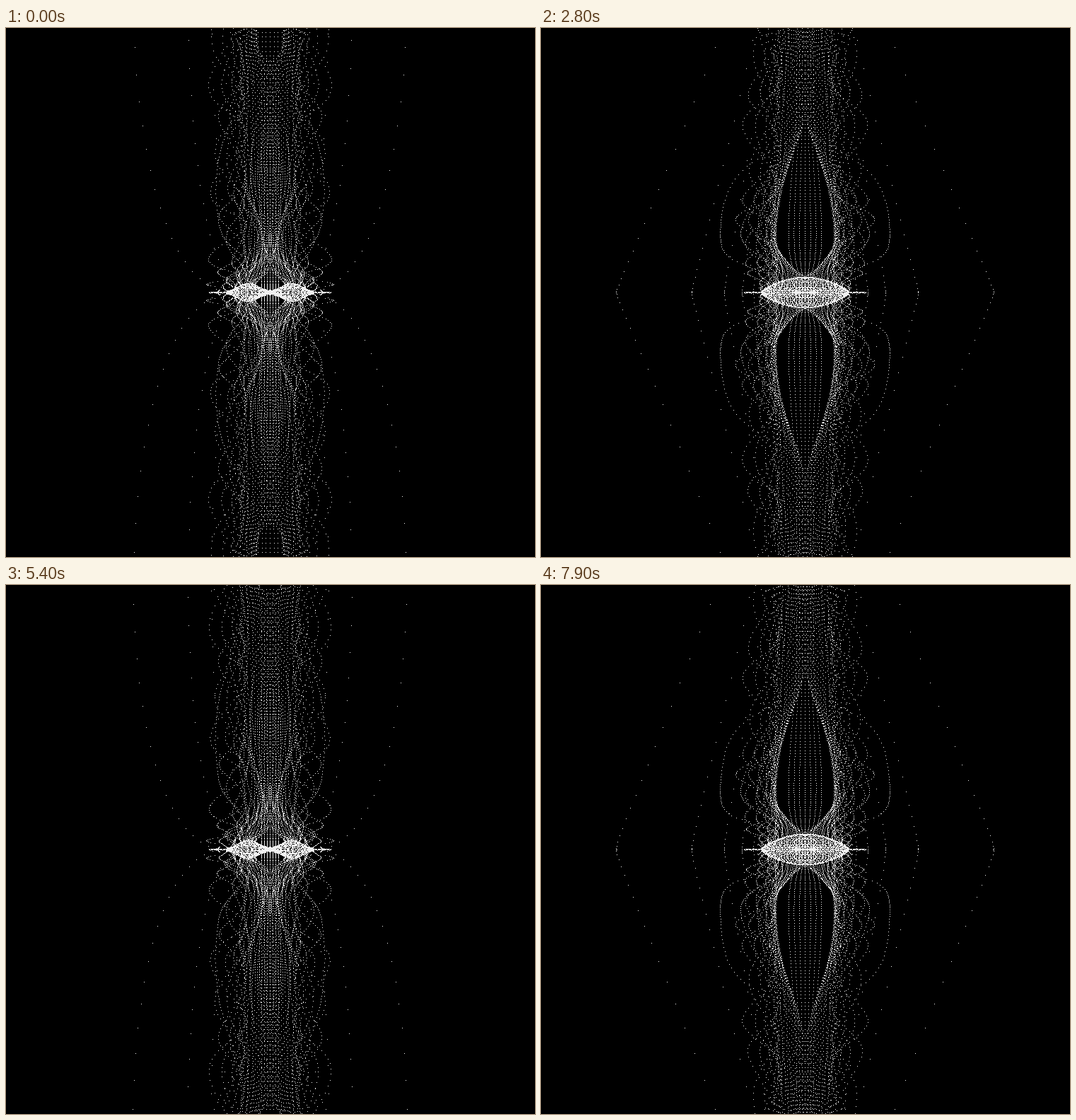
Write an HTML page with a canvas that moves like this. It is 748 px wide and 748 px high and loops after 8000 ms.

```html
<!DOCTYPE html>
<html>
<head>
<meta charset="utf-8">
<style>
html, body { margin: 0; width: 100%; height: 100%; overflow: hidden; background: #000; }
canvas { display: block; }
</style>
</head>
<body>
<canvas id="stage" width="748" height="748"></canvas>
<script>
const ctx = document.getElementById('stage').getContext('2d');
const MID = 374, CX = 373.5, SPREAD = 2.5, DEPTH = 1.2;
const PERIOD = 5, BIRTH = .65, ROWS = 110, COLUMNS = 25;

const mix = (a, b, f) => a + (b - a) * f;
const toRow = dist => Math.sqrt(dist / DEPTH);

function smooth(a, b, v) {
  const f = Math.min(1, Math.max(0, (v - a) / (b - a)));
  return f * f * (3 - 2 * f);
}

// An opening is born near the middle, grows, then drifts outwards.
function pose(t) {
  const age = (t - BIRTH + PERIOD) % PERIOD;
  const calm = smooth(2.3, 3.3, age) * (1 - smooth(4.8, 5, age));
  const lobes = 1 - smooth(.4, 1.2, age) * (1 - smooth(2.4, 3.2, age));
  return {
    t, calm, lobes,
    start: mix(20 + 60 * Math.exp(-age), 80 * age - 26, smooth(2.3, 3.3, age)),
    end: 80 + 81 * age + 200 * smooth(2.3, 3.3, age),
    width: 18 + 24 * Math.max(0, Math.sin(Math.PI * age / 4.4)),
    core: 2 + 32 * lobes,
    reach: 267 - 72 * calm,
    crest: 10 - 10 * Math.cos(2 * Math.PI * (age - 1.9) / PERIOD)
  };
}

function dot(x, y) {
  if (y >= 0 && y < 748) ctx.fillRect(Math.floor(x), Math.floor(y), 1, 1);
}

function pair(x, y) {
  dot(CX + x, y);
  dot(CX - x, y);
}

// half width of an opening between rows a and b
function opening(e, a, b, width, skew) {
  const s = (e - a) / (b - a);
  return s > 0 && s < 1 ? width * Math.sin(Math.PI * s ** skew) : 0;
}

function body(side, p) {
  const a = toRow(p.start), b = toRow(p.end * (side > 0 ? 1.06 : 1)), c = toRow(p.core);
  const skew = mix(.7, .35, p.calm);
  for (let r = 0; r < ROWS; r++) {
    for (let n = 0; n < COLUMNS; n++) {
      const k = n + .6, q = k / COLUMNS;
      const e = 18 * ((r + n * .37 % 1) / ROWS) ** 1.15;
      const gap = Math.max(opening(e, a, b, p.width, skew), opening(e, 1.7, c, 26, .8));
      const edge = Math.min(Math.abs(e - a), Math.abs(e - b), Math.abs(e - c));
      const pull = gap ? gap * gap / (4 * SPREAD) : -60 * (1 - Math.exp(-edge / 2));
      let x = SPREAD * k + 120 * Math.tanh(pull / k / 120);
      // frayed rim, and a waist on every other column while calm
      x *= 1 + .45 * q ** 3 * Math.sin(e * 1.3 - 1.3 * p.t + n * 2.1) * Math.min(1, e / 5);
      if (n % 2) x *= 1 - .62 * p.calm * Math.exp(-(((DEPTH * e * e - 70) / 55) ** 2));
      const w = e + .25 * Math.sin(e * 1.2 + n * .2 - 2.4 * p.t) * Math.min(1, e / 4);
      pair(x, MID + side * DEPTH * w * Math.hypot(w, k * .15));
    }
    // thin threads seen through the openings
    const e = 18 * r / ROWS, gap = opening(e, a, b, p.width, skew);
    const y = MID + side * DEPTH * e * e;
    dot(CX, y);
    for (let j = 1; j < 4; j++) pair(j * (4 + gap * .09), y);
  }
}

function fringe(side, { reach, crest }) {
  for (let e = side > 0 ? .5 : 0; e < 18; e++) {
    for (let n = 0; n < 6; n++) {
      const row = e + n * .23;
      const x = reach * Math.cos(.065 * (row - crest)) * 3 / (3 + 2 * n);
      pair(x, MID + side * DEPTH * row * row);
    }
  }
}

function bow({ lobes }) {
  for (let n = 0; n < 70; n++) {
    const u = n / 50;
    const thick = u < 1
      ? 2 + lobes * 11 * Math.sin(Math.PI * u) ** 2 + (1 - lobes) * 20 * (1 - u * u)
      : 1;
    for (let j = -9; j <= 9; j++) {
      if (u < 1 || (n + j) % 7 === 0) {
        pair(62 * u + j % 3 * .4, MID + thick * Math.sin(j * Math.PI / 18));
      }
    }
  }
}

function draw(now) {
  const p = pose(Math.floor(now % 8000 / 100) / 10);
  ctx.fillStyle = '#000';
  ctx.fillRect(0, 0, 748, 748);
  ctx.fillStyle = '#f0f0f0';
  for (const side of [-1, 1]) {
    body(side, p);
    fringe(side, p);
  }
  bow(p);
  requestAnimationFrame(draw);
}
requestAnimationFrame(draw);
</script>
</body>
</html>
```
